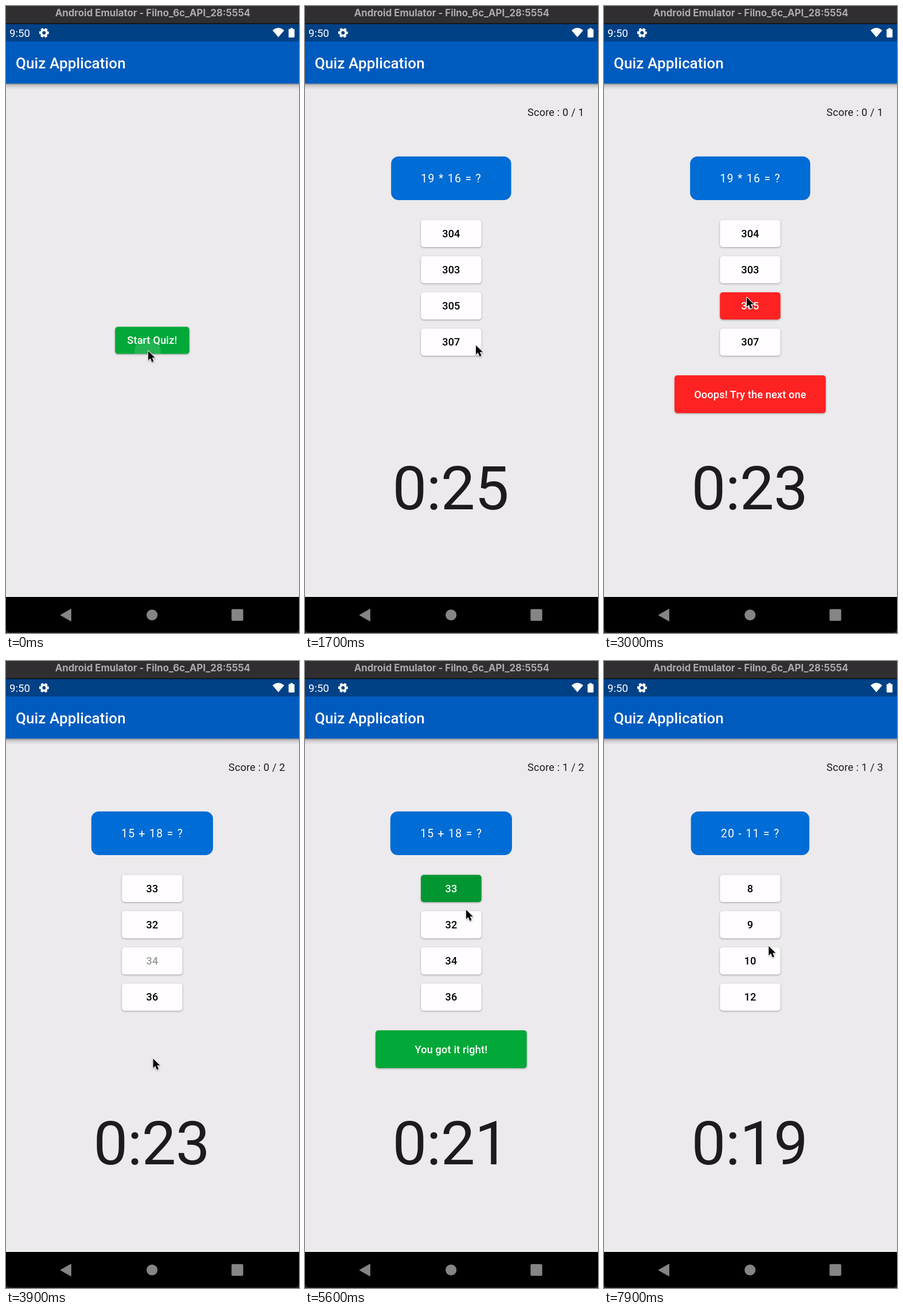
An HTML page that plays this animation: 511 px wide and 1095 px high, repeating every 8 s.

```html
<!DOCTYPE html>
<html lang="en">
<head>
<meta charset="utf-8">
<title>Quiz Application</title>
<style>
  html, body { margin: 0; width: 100%; height: 100%; overflow: hidden; background: #eceaec; }
  svg { display: block; }
  text { font-family: Roboto, sans-serif; white-space: pre; }
  .label { font-size: 18.2px; font-weight: 500; letter-spacing: .13px; text-anchor: middle; }
  .raised { filter: drop-shadow(0 1.5px 1.5px rgba(0, 0, 0, .35)); }
</style>
</head>
<body>
<svg id="stage" width="511" height="1095" viewBox="0 0 511 1095">
  <defs>
    <linearGradient id="barShadow" x1="0" y1="0" x2="0" y2="1">
      <stop offset="0" stop-color="#000" stop-opacity=".4"/>
      <stop offset=".4" stop-color="#000" stop-opacity=".13"/>
      <stop offset="1" stop-color="#000" stop-opacity="0"/>
    </linearGradient>
    <clipPath id="inkClip"><rect id="inkBox" rx="5"/></clipPath>
  </defs>

  <rect width="511" height="1095" fill="#eceaec"/>
  <rect y="135" width="511" height="11" fill="url(#barShadow)"/>
  <rect y="62" width="511" height="73.5" fill="#005bbf"/>
  <rect y="31" width="511" height="31" fill="#004186"/>
  <rect width="511" height="31.5" fill="#0c0b0c"/>
  <rect width="511" height="30" fill="#302e30"/>
  <text x="256" y="18" text-anchor="middle" fill="#adabad"
    style="font: 700 16.8px Inter, sans-serif">Android Emulator - Filno_6c_API_28:5554</text>
  <g fill="#fff">
    <text x="6" y="53.5" font-size="18.6">9:50</text>
    <path d="M475 54.5L464.8 42.5Q475 34 485.2 42.5Z"/>
    <path d="M496 38.5h4v1.8h2q1.2 0 1.2 1.2v12.3q0 1.2-1.2 1.2h-8q-1.2 0-1.2-1.2v-12.3q0-1.2 1.2-1.2h2z"/>
    <text x="17" y="109" font-size="26" font-weight="500" letter-spacing=".1">Quiz Application</text>
  </g>
  <g fill="none" stroke="#fff" transform="translate(66.3 46.8) rotate(-17)">
    <circle r="4.8" stroke-width="3.6"/>
    <circle r="7" stroke-width="3" stroke-dasharray="4.4 2.93"/>
  </g>

  <rect y="1030.5" width="511" height="2" fill="#f4f2f4"/>
  <rect y="1032" width="511" height="63" fill="#2b292b"/>
  <path d="M0 1032H511V1086Q511 1094 503 1094H8Q0 1094 0 1086Z" fill="#000"/>
  <g fill="#868486">
    <path d="M95 1063.7L113.3 1053.2V1074.2Z" stroke="#868486" stroke-linejoin="round"/>
    <circle cx="254.7" cy="1063.5" r="9.6"/>
    <rect x="393.3" y="1053.3" width="20.4" height="20.4" rx="2"/>
  </g>

  <rect id="startBox" class="raised" x="190.3" y="560.2" width="129.4" height="47.4" rx="5" fill="#02a838"/>
  <g id="quizBoxes">
    <rect id="askBox" y="262.8" height="76.2" rx="13" fill="#006cd5"/>
  </g>
  <rect id="noteBox" class="raised" x="123" y="645" width="263.7" height="66" rx="5"/>
  <g clip-path="url(#inkClip)"><circle id="ink"/></g>
  <text id="startText" class="label" x="254.9" y="590.4" fill="#fff">Start Quiz!</text>
  <g id="quizTexts">
    <text id="score" x="388" y="192.3" font-size="18.2" letter-spacing=".17" fill="#1d1b1e"/>
    <text id="ask" y="307.9" font-size="19.5" letter-spacing="1.3" fill="#fff"/>
    <text id="clock" x="152.4" y="879" font-size="106.5" letter-spacing="-.6" fill="#1d1b1e"/>
  </g>
  <text id="noteText" class="label" x="254.9" y="684.6" fill="#fff"/>
  <path id="cursor" d="M0 0V16.3L3.8 12.8L6.6 19.4L9.6 18.1L6.8 11.7H12Z" fill="#000" stroke="#fff"
    stroke-width="2" stroke-linejoin="round" paint-order="stroke"
    style="filter: drop-shadow(0 1px 1px rgba(0, 0, 0, .35))"/>
</svg>
<script>
const LOOP = 8000, START = 900, GREEN = '#02a838', RED = '#ff2222';
const el = id => document.getElementById(id);
const set = (node, attrs) => { for (const k in attrs) node.setAttribute(k, attrs[k]); };
const clamp = v => Math.max(0, Math.min(1, v));
const ease = k => k * k * (3 - 2 * k);
const show = (id, on) => set(el(id), { display: on ? 'inline' : 'none' });

function add(parent, tag, attrs) {
  const node = document.createElementNS('http://www.w3.org/2000/svg', tag);
  set(node, attrs);
  return el(parent).appendChild(node);
}

const rounds = [
  { at: START, ask: '19 * 16 = ?', width: 209.5, answers: [304, 303, 305, 307],
    pick: 2, picked: 2680, color: RED, note: 'Ooops! Try the next one', score: '0 / 1' },
  { at: 3820, ask: '15 + 18 = ?', width: 212.2, answers: [33, 32, 34, 36],
    pick: 0, picked: 5400, color: GREEN, note: 'You got it right!', score: '0 / 2', won: '1 / 2' },
  { at: 7580, ask: '20 - 11 = ?', width: 206.6, answers: [8, 9, 10, 12],
    pick: -1, picked: Infinity, score: '1 / 3' }
];
const ticks = [2000, 3000, 4000, 5000, 6000, 7100];

// time, x, y of the pointer tip
const path = [
  [0, 248, 602.5], [1000, 248, 602.5], [1650, 298, 592.5], [1720, 298, 592.5],
  [2200, 249, 509], [3000, 249, 509], [3350, 256.6, 694.5], [4450, 256.6, 694.5],
  [5100, 281, 434.5], [6100, 281, 434.5], [6880, 233, 694.5], [7520, 233, 694.5],
  [7900, 287.3, 498]
];

const rowY = i => 373.5 + i * 63.25;
const startBox = [190.3, 560.2, 129.4, 47.4];
const noteBox = [123, 645, 263.7, 66];
const rowBox = i => [202.2, rowY(i), 105.5, 47.4];
const inks = [
  { from: -120, to: 500, x: 247, y: 603, r: 85, color: '#fff', box: startBox },
  { from: 2450, to: 2950, x: 248, y: 509, r: 90, color: '#000', box: rowBox(2) },
  { from: 3400, to: 3820, x: 256, y: 694, r: 180, color: '#fff', box: noteBox },
  { from: 5250, to: 5900, x: 280, y: 421, r: 150, color: '#000', box: rowBox(0) },
  { from: 7080, to: 7390, x: 232, y: 694, r: 190, color: '#fff', box: noteBox }
];

const rows = [0, 1, 2, 3].map(i => ({
  box: add('quizBoxes', 'rect', { class: 'raised', x: 202.2, y: rowY(i), width: 105.5, height: 47.4, rx: 5 }),
  text: add('quizTexts', 'text', { class: 'label', x: 254.9, y: rowY(i) + 30.1 })
}));

function drawCursor(t) {
  let i = path.findIndex(p => p[0] > t);
  if (i < 0) i = path.length;
  const a = path[i - 1], b = path[i] || a;
  const k = a === b ? 0 : ease((t - a[0]) / (b[0] - a[0]));
  const mix = n => a[n] + (b[n] - a[n]) * k;
  set(el('cursor'), { transform: `translate(${mix(1)} ${mix(2)})` });
}

function drawInk(t) {
  const ink = inks.find(n => t >= n.from && t < n.to);
  show('ink', !!ink);
  if (!ink) return;
  const k = (t - ink.from) / (ink.to - ink.from), [x, y, width, height] = ink.box;
  set(el('inkBox'), { x, y, width, height });
  set(el('ink'), { cx: ink.x, cy: ink.y, r: ink.r * k ** .8, fill: ink.color, opacity: .13 * (1 - k ** 3) });
}

function drawRound(t) {
  const n = rounds.filter(r => t >= r.at).length - 1;
  const round = rounds[n], done = !!round && t >= round.picked;
  show('startBox', !round);
  show('startText', !round);
  show('quizBoxes', !!round);
  show('quizTexts', !!round);
  show('noteBox', done);
  show('noteText', done);
  if (!round) return;

  const left = 254.9 - round.width / 2;
  set(el('askBox'), { x: left, width: round.width });
  set(el('ask'), { x: left + 52.1 });
  el('ask').textContent = round.ask;
  el('score').textContent = 'Score : ' + (done && round.won || round.score);
  el('clock').textContent = '0:' + (25 - ticks.filter(at => t >= at).length);

  const last = rounds[n - 1];
  rows.forEach((row, i) => {
    const hit = done && i === round.pick;
    let light = 0;
    if (hit) light = clamp((t - round.picked) / 200);
    else if (last && i === last.pick) light = 1 - clamp((t - round.at) / 200);
    const v = Math.round(255 * light);
    set(row.box, { fill: hit ? round.color : '#fffdff' });
    set(row.text, { fill: `rgb(${v},${v},${v})` });
    row.text.textContent = round.answers[i];
  });
  if (done) {
    set(el('noteBox'), { fill: round.color });
    el('noteText').textContent = round.note;
  }
}

function draw(t) {
  drawRound(t);
  drawInk(t);
  drawCursor(t);
}

const begin = performance.now();
function frame() {
  draw((performance.now() - begin) % LOOP);
  requestAnimationFrame(frame);
}
frame();
</script>
</body>
</html>
```
